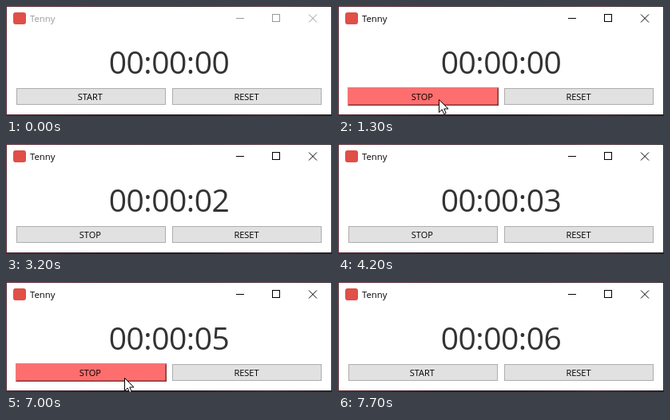
Write an HTML page that moves like this. It is 408 by 138 pixels and loops after 8 s.

```html
<!DOCTYPE html>
<html lang="en">
<head>
<meta charset="utf-8">
<title>Stopwatch</title>
<style>
  html, body { margin: 0; width: 100%; height: 100%; overflow: hidden; }
  svg { display: block; width: 408px; height: 138px; }
  text { font-family: "Open Sans", "Noto Sans", sans-serif; }
  .label { font-size: 11px; text-anchor: middle; fill: #000; }
  #digits { font-size: 39px; letter-spacing: -0.5px; fill: #333; }
  #title { font-size: 11.3px; }
  #controls { fill: none; stroke-width: 1; }
  .flat { fill: #e1e1e1; stroke: #adadad; }
</style>
</head>
<body>
<svg viewBox="0 0 408 138">
  <defs>
    <linearGradient id="desk">
      <stop offset="0" stop-color="#5a2a33"/>
      <stop offset="0.3" stop-color="#3a1c24"/>
      <stop offset="0.55" stop-color="#2a2024"/>
      <stop offset="0.8" stop-color="#4a2a2e"/>
      <stop offset="1" stop-color="#2b2225"/>
    </linearGradient>
  </defs>
  <rect width="408" height="138" fill="url(#desk)"/>
  <rect x="1" y="1" width="406" height="135" fill="#fff"/>

  <rect x="9" y="8" width="16" height="15" rx="3" fill="#e04f48"/>
  <text id="title" x="30" y="20">Tenny</text>
  <g id="controls">
    <path d="M288 15.5H298M333.5 10.5H342.5V19.5H333.5Z" shape-rendering="crispEdges"/>
    <path d="M379 10.5L389 20.5M389 10.5L379 20.5"/>
  </g>

  <text id="digits" x="128.7" y="85"></text>

  <rect class="flat" x="13.5" y="103.5" width="186" height="20"/>
  <rect class="flat" x="208.5" y="103.5" width="186" height="20"/>
  <g id="hover">
    <rect x="12" y="102" width="189" height="23" fill="#ff6e6e"/>
    <path d="M12 102H201L199 104H14V123L12 125Z" fill="#f47474"/>
    <path d="M201 102V125H12L14 123.5H199.5V104Z" fill="#7d3538"/>
  </g>
  <text class="label" id="toggle" x="105.3" y="118"></text>
  <text class="label" x="301" y="118">RESET</text>

  <path id="cursor" d="M0.5 0.5V16.5L4.2 13L6.7 18.6L9.2 17.5L6.8 12H12Z"
        fill="#fff" stroke="#000" stroke-linejoin="round"/>
</svg>
<script>
  const LOOP = 8000;
  const el = id => document.getElementById(id);
  const [title, controls, digits, hover, toggle, cursor] =
    ["title", "controls", "digits", "hover", "toggle", "cursor"].map(el);

  const ticks = [2300, 3200, 4200, 5100, 6200, 7200];
  const active = 1200, started = 1300, stopped = 7300;

  // Pointer visits: [time, x, y]; the last time of a visit hides it.
  const visits = [
    [[500, 131, 132], [600, 129, 123], [700, 128, 120], [800, 126, 118],
     [1000, 126, 117], [1400, 128, 120], [1500, 131, 131], [1600]],
    [[6800, 146, 132], [6900, 148, 123], [7000, 148, 120],
     [7400, 149, 121], [7500, 150, 124], [7600, 152, 132], [7700]]
  ];

  function pointerAt(t) {
    for (const visit of visits) {
      const step = visit.filter(p => p[0] <= t).pop();
      if (step && step.length > 1) return step;
    }
    return null;
  }

  const show = (node, on) => node.setAttribute("visibility", on ? "visible" : "hidden");

  function draw(t) {
    const focused = t >= active;
    title.setAttribute("fill", focused ? "#000" : "#999");
    controls.setAttribute("stroke", focused ? "#000" : "#999");

    const seconds = ticks.filter(tick => tick <= t).length;
    digits.textContent = "00:00:" + String(seconds).padStart(2, "0");
    toggle.textContent = t >= started && t < stopped ? "STOP" : "START";

    const p = pointerAt(t);
    show(cursor, p);
    show(hover, p && p[2] < 125);
    if (p) cursor.setAttribute("transform", `translate(${p[1]} ${p[2]})`);
  }

  const origin = performance.now();
  function frame() {
    draw((performance.now() - origin) % LOOP);
    requestAnimationFrame(frame);
  }
  draw(0);
  requestAnimationFrame(frame);
</script>
</body>
</html>
```
